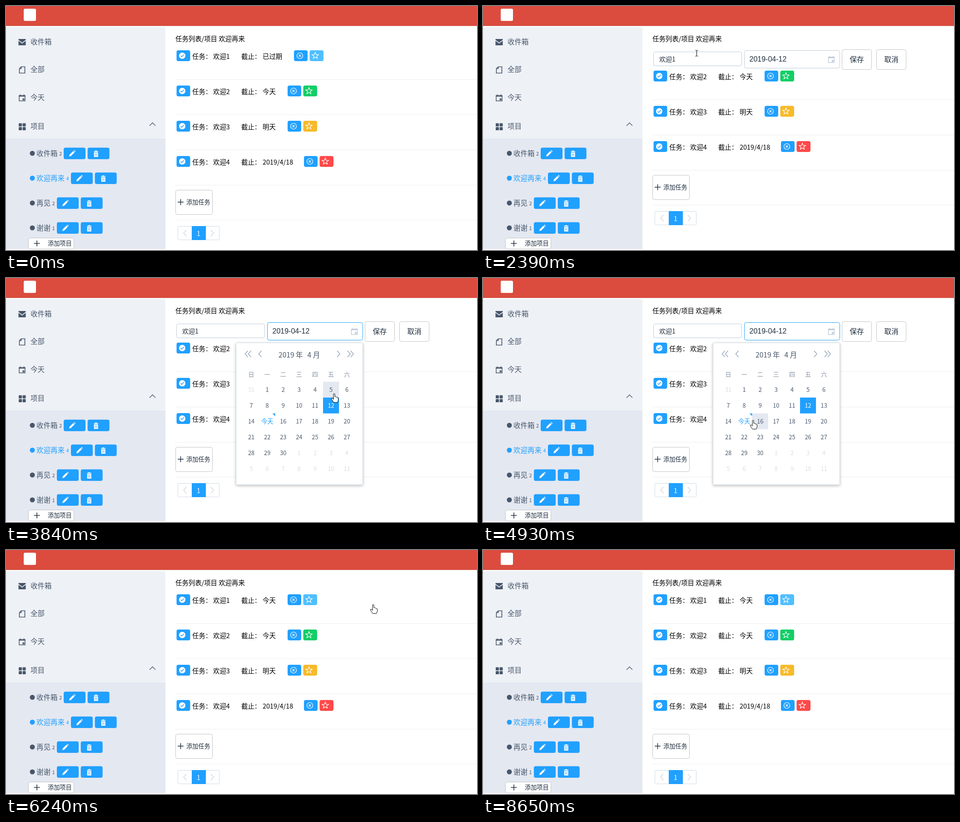
An HTML page with a canvas that plays this animation: 1037 by 540 pixels, repeating every 9430 ms.

```html
<!DOCTYPE html>
<html lang="zh-CN">
<head>
<meta charset="utf-8">
<style>
html, body { margin: 0; width: 100%; height: 100%; overflow: hidden; background: #fff; }
canvas { display: block; }
</style>
</head>
<body>
<canvas id="stage" width="1037" height="540"></canvas>
<script>
const ctx = document.getElementById('stage').getContext('2d');
const LOOP = 9430;
const BLUE = '#20a0ff', SLATE = '#48576a', INK = '#1f2d3d', BORDER = '#c4c4c4', FIELD = '#bfcbd9', MIST = '#97a8be';
const CJK = '"Noto Sans CJK SC", "Noto Sans CJK", sans-serif';
const ARIAL = '"Liberation Sans", sans-serif';

// Key times in ms
const EDIT = 1840, OPEN = 3080, PICK = 5390, SAVE = 6240, RELEASE = 6470;
const SHOW = 70, HIDE = 8640;

// Pointer track: time, x, y
const TRACK = [
  [70, 882, 480], [990, 588, 109], [1070, 584, 113], [1840, 584, 113],
  [2110, 522, 98], [2390, 470, 104], [2560, 470, 104], [3000, 700, 118],
  [3450, 700, 118], [3840, 722, 255], [4070, 748, 274], [4640, 748, 274],
  [5000, 578, 318], [5160, 578, 318], [5230, 582, 320], [5390, 582, 320],
  [5780, 783, 138], [6090, 808, 120], [6400, 808, 120], [6470, 805, 118],
  [6600, 805, 118], [7260, 489, 113], [7560, 461, 111], [7720, 461, 111],
  [7880, 458, 111], [8190, 458, 111], [8640, 738, 530]
];

const ICON = {
  mail: 'M-8-5V-7H8V-5L0 1ZM-8-3L0 3L8-3V7H-8Z',
  page: 'M-2-7H6V7H-6V-3ZM-2-7V-3H-6',
  dateFrame: 'M-6.5-5H6.5V6.5H-6.5ZM-4-8V-5M4-8V-5',
  dateFill: 'M-7-6H7V-3H-7ZM1 1H5V5H1Z',
  pencil: 'M-7 7L-6 3L2-5L5-2L-3 6ZM3-6L4.5-7L7-4.5L6-3Z',
  bin: 'M-5-4H5V-5.5H2V-7H-2V-5.5H-5ZM-4.5-3H4.5V7H-4.5Z',
  binSlots: 'M-1.5-1V5M1.5-1V5',
  check: 'M-3.5 0L-1 2.5L3.5-2.5',
  cross: 'M-2.5-2.5L2.5 2.5M2.5-2.5L-2.5 2.5',
  plus: 'M-6.5 0H6.5M0-6.5V6.5',
  up: 'M-6.5 3L0-3.5L6.5 3',
  left: 'M3-7L-3 0L3 7',
  right: 'M-3-7L3 0L-3 7',
  beam: 'M-3-6.5H-1L0-5.5L1-6.5H3M0-5.5V5.5M-3 6.5H-1L0 5.5L1 6.5H3',
  arrow: 'M0 0V16L4 12.5L6.5 18L8.8 17L6.3 11.7H11.5Z',
  hand: 'M-1.5 1Q0-1 1.5 1V7Q3 6 4 8Q5.5 7 6.5 9Q9 8.5 9 11V15L7 20H-1L-6 12.5Q-6.5 10.5-4 10.5L-1.5 13Z',
  star: 'M' + Array.from({ length: 10 }, (_, i) => {
    const r = i % 2 ? 3.2 : 7.5, a = i * Math.PI / 5;
    return (r * Math.sin(a)).toFixed(2) + ' ' + (-r * Math.cos(a)).toFixed(2);
  }).join('L') + 'Z'
};

function icon(name, x, y, fill, stroke, width = 1.5) {
  const path = new Path2D(ICON[name]);
  ctx.save();
  ctx.translate(x, y);
  if (fill) { ctx.fillStyle = fill; ctx.fill(path); }
  if (stroke) { ctx.strokeStyle = stroke; ctx.lineWidth = width; ctx.stroke(path); }
  ctx.restore();
}

function rect(x, y, w, h, color) {
  ctx.fillStyle = color;
  ctx.fillRect(x, y, w, h);
}

function box(x, y, w, h, fill, stroke, radius = 4) {
  const inset = stroke ? 0.5 : 0;
  ctx.beginPath();
  ctx.roundRect(x + inset, y + inset, w - 2 * inset, h - 2 * inset, radius);
  ctx.fillStyle = fill;
  ctx.fill();
  if (stroke) { ctx.strokeStyle = stroke; ctx.lineWidth = 1; ctx.stroke(); }
}

function disc(x, y, r, color, outline) {
  ctx.beginPath();
  ctx.arc(x, y, r, 0, 7);
  ctx.fillStyle = ctx.strokeStyle = color;
  ctx.lineWidth = 1.2;
  outline ? ctx.stroke() : ctx.fill();
}

// y is the visual middle of the glyphs
function text(s, x, y, size, color, align = 'left', family = CJK) {
  ctx.font = `${size}px ${family}`;
  ctx.textAlign = align;
  ctx.fillStyle = color;
  ctx.fillText(s, x, y + size * 0.37);
}

function dateIcon(x, y, color) {
  icon('dateFrame', x, y, null, color);
  icon('dateFill', x, y, color);
}

function sidebar() {
  rect(0, 0, 1037, 44, '#db4c3f');
  rect(0, 43, 1037, 1, '#cf4437');
  rect(0, 44, 1037, 1, '#f0e4e3');
  box(39, 6, 27, 27, '#fff', null, 3);
  rect(0, 47, 351, 246, '#eef1f6');
  rect(0, 293, 351, 245, '#e4e8f1');

  icon('mail', 35.5, 80, SLATE);
  icon('page', 35.5, 141.5, null, SLATE, 1.7);
  dateIcon(35.5, 203.5, SLATE);
  for (const x of [28, 36.5]) for (const y of [259.5, 268]) box(x, y, 7, 7, SLATE, null, 1);
  ['收件箱', '全部', '今天', '项目'].forEach((s, i) => text(s, 54, [79, 140.5, 202, 266][i], 15.5, SLATE));
  icon('up', 322.5, 262, null, SLATE, 1.4);

  [['收件箱', 2], ['欢迎再来', 4], ['再见', 2], ['谢谢', 1]].forEach(([name, count], i) => {
    const y = 326 + 55 * i, color = i === 1 ? BLUE : SLATE;
    const end = 67 + name.length * 15.5;
    disc(58, y, 5.5, color);
    text(name, 67, y, 15.5, color);
    text(count, end + 3.5, y + 1, 11, color);
    const x = Math.round(end + 13.5);
    box(x, y - 12.5, 48, 25.5, BLUE);
    icon('pencil', x + 19, y, '#fff');
    box(x + 52.7, y - 12.5, 48, 25.5, BLUE);
    icon('bin', x + 71.2, y + 1, '#fff', null);
    icon('binSlots', x + 71.2, y + 1, null, BLUE, 1);
  });
  box(49, 513, 101, 25, '#fff', BORDER);
  icon('plus', 68, 525.5, null, INK);
  text('添加项目', 92, 525, 13.2, INK);
}

const STARS = ['#50bfff', '#13ce66', '#f7ba2a', '#ff4949'];
const buttonX = due => ({ 已过期: 634, '2019/4/18': 656 })[due] || 620;
const dueDates = t => [t < SAVE ? '已过期' : '今天', '今天', '明天', '2019/4/18'];

function taskRow(i, top, due) {
  const y = top + 14, x = buttonX(due);
  box(375.5, top, 30, 24, BLUE);
  disc(388, top + 12, 7, '#fff');
  icon('check', 388, top + 12, null, BLUE);
  text('任务：', 410, y, 14.4, '#000');
  text('欢迎' + (i + 1), 456, y, 14.4, '#000');
  text('截止：', 518, y, 14.4, '#000');
  text(due, 565, y, 14.4, '#000');
  box(x, top, 30, 24, BLUE);
  disc(x + 13, top + 12, 6.5, '#fff', true);
  icon('cross', x + 13, top + 12, null, '#fff', 1.1);
  box(x + 34.5, top, 30.5, 24, STARS[i]);
  icon('star', x + 47, top + 12, null, '#fff', 1.2);
  rect(372, top + 64, 665, 1, '#eee');
}

function taskList(t, editing) {
  const shift = editing ? -33 : 0;
  text('任务列表/项目 欢迎再来', 373, 72.5, 14.4, '#000');
  dueDates(t).forEach((due, i) => {
    if (i || !editing) taskRow(i, 98 + 78 * i + shift, due);
  });
  const y = 407 + shift;
  box(373, y, 82, 55, '#fff', BORDER);
  icon('plus', 384.5, y + 27, null, INK);
  text('添加任务', 397, y + 27, 13.2, INK);
  rect(372, y + 66, 665, 1, '#eee');
  box(378, y + 80, 92, 31, '#fff', '#d1dbe5', 1);
  rect(409, y + 80, 31, 31, BLUE);
  icon('left', 394, y + 95.5, null, '#ccd2da', 1.2);
  icon('right', 454, y + 95.5, null, '#ccd2da', 1.2);
  text('1', 424, y + 97, 14, '#fff', 'center');
}

function editForm(t, pointer) {
  const focused = t >= OPEN && t < PICK;
  box(375, 101, 195, 32, '#fff', FIELD);
  text('欢迎1', 388, 117.5, 14, INK);
  box(575, 98, 211, 40, '#fff', focused ? BLUE : FIELD);
  text(t < PICK ? '2019-04-12' : '2019-04-15', 586.5, 117.5, 16, INK, 'left', ARIAL);
  dateIcon(767, 118.5, FIELD);
  if (focused && Math.floor((t - 3160) / 520) % 2 === 0) rect(665, 109, 1, 18, '#000');
  [['保存', 790], ['取消', 866]].forEach(([label, x]) => {
    const hover = inside(pointer, x, 96, 66, 44);
    box(x, 96, 66, 45, '#fff', hover ? BLUE : BORDER);
    text(label, x + 33, 118, 15.6, hover ? BLUE : INK, 'center');
  });
}

const CELL = 35.1, GRID_X = 522.5, GRID_Y = 229.5;

function calendar(alpha, pointer) {
  ctx.save();
  ctx.globalAlpha = alpha;
  ctx.translate(0, 143);
  ctx.scale(1, alpha);
  ctx.translate(0, -143);
  ctx.save();
  ctx.shadowColor = 'rgba(0,0,0,.25)';
  ctx.shadowBlur = 6;
  ctx.shadowOffsetY = 2;
  box(506, 143, 280, 315, '#fff', null, 2);
  ctx.restore();
  box(506, 143, 280, 315, '#fff', '#d1dbe5', 2);
  for (const x of [529.5, 536.5, 559.5]) icon('left', x, 168, null, MIST);
  for (const x of [732, 755, 762]) icon('right', x, 168, null, MIST);
  text('2019 年', 600, 170.5, 15.6, SLATE);
  text('4 月', 663.5, 170.5, 15.6, SLATE);

  const centre = col => GRID_X + (col + 0.5) * CELL;
  [...'日一二三四五六'].forEach((s, col) => text(s, centre(col), 213, 13, '#8391a5', 'center'));
  for (let n = 0; n < 42; n++) {
    const col = n % 7, row = Math.floor(n / 7);
    const x = GRID_X + col * CELL, y = GRID_Y + row * CELL;
    const current = n > 0 && n < 31, chosen = n === 12, today = n === 15;
    if (chosen) rect(x, y, CELL, CELL, BLUE);
    else if (current && inside(pointer, x, y, CELL, CELL)) rect(x, y, CELL, CELL, '#e4e8f1');
    const label = today ? '今天' : current ? n : n ? n - 30 : 31;
    const color = chosen ? '#fff' : today ? BLUE : current ? SLATE : '#ddd';
    text(label, centre(col), y + 17.5, today ? 13.2 : 12.8, color, 'center');
    if (today) {
      ctx.fillStyle = BLUE;
      ctx.fill(new Path2D(`M${x + CELL - 6} ${y}h6v6z`));
    }
  }
  ctx.restore();
}

const clamp = v => Math.max(0, Math.min(1, v));
const inside = (p, x, y, w, h) => p.x >= x && p.x < x + w && p.y >= y && p.y < y + h;

function pointerAt(t) {
  const next = TRACK.findIndex(k => k[0] > t);
  if (next < 1) return { x: -99, y: -99 };
  const [t0, x0, y0] = TRACK[next - 1], [t1, x1, y1] = TRACK[next];
  const u = (t - t0) / (t1 - t0), e = u * u * (3 - 2 * u);
  return { x: x0 + (x1 - x0) * e, y: y0 + (y1 - y0) * e };
}

function cursorShape(t, p) {
  const form = t >= EDIT && t < RELEASE;
  if (form) {
    if (t >= OPEN && t < PICK && inside(p, GRID_X, GRID_Y, 7 * CELL, 6 * CELL)) return 'hand';
    if (inside(p, 790, 96, 66, 44) || inside(p, 866, 96, 66, 44)) return 'hand';
    if (inside(p, 375, 95, 196, 38) || inside(p, 571, 98, 215, 39)) return 'beam';
  }
  const due = dueDates(t);
  for (let i = form ? 1 : 0; i < 4; i++) {
    const top = 98 + 78 * i - (form ? 33 : 0), x = buttonX(due[i]);
    if (t >= OPEN && t < PICK) break;
    if (inside(p, x, top, 65, 24)) return 'hand';
    if (inside(p, 410, top + 5, 83, 18) || inside(p, 518, top + 5, x - 544, 18)) return 'beam';
  }
  return 'arrow';
}

function cursor(t, p) {
  const shape = cursorShape(t, p);
  const x = Math.round(p.x) + 0.5, y = Math.round(p.y) + 0.5;
  if (shape === 'beam') icon('beam', x, y, null, '#000', 1);
  else icon(shape, x, y, '#fff', '#000', 1);
}

function draw(t) {
  const editing = t >= EDIT && t < SAVE;
  const pointer = pointerAt(t);
  rect(0, 0, 1037, 540, '#fff');
  sidebar();
  taskList(t, editing);
  if (editing) {
    editForm(t, pointer);
    const shown = 1 - (1 - clamp((t - OPEN) / 220)) ** 3;
    const panel = shown * (1 - clamp((t - PICK) / 200));
    if (panel > 0) calendar(panel, pointer);
  }
  if (t >= SHOW && t < HIDE) cursor(t, pointer);
}

const start = performance.now();
function tick() {
  draw((performance.now() - start) % LOOP);
  requestAnimationFrame(tick);
}
tick();
</script>
</body>
</html>
```
